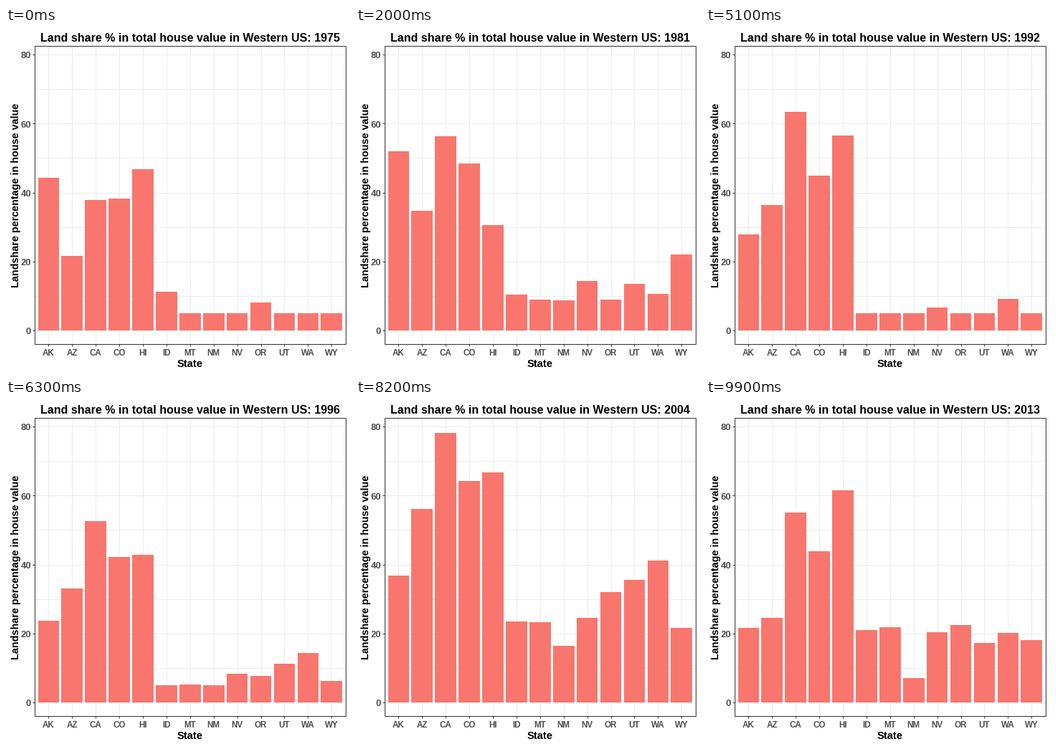
Animation of 480 by 480 pixels, one loop 10 s. Source, as a matplotlib script:

```python
import matplotlib.pyplot as plt
import numpy as np
from matplotlib.animation import FuncAnimation
from matplotlib.patches import Rectangle

SIZE, DPI = 480, 96
FRAMES, INTERVAL = 100, 100
LEFT, TOP, RIGHT, BOTTOM = 40, 25, 474, 441
FIRST_X, STEP = 59.36, 32.908
BAR_W = 0.9 * STEP
BASE_Y, UNIT = 422, 4.812
FLOOR, SWING = 5, 0.18
SALMON, GRID, DARK, GREY = "#F8766D", "#EBEBEB", "#333333", "#4D4D4D"

# A few key points per state; the market cycle fills the years between.
KEY_YEARS = [1975, 1981.5, 1987, 1992, 2001, 2008, 2013]
SHARES = {
    "AK": [44.3, 52, 35, 27.9, 29.8, 32.7, 21.7],
    "AZ": [21.7, 34.8, 41.6, 36.4, 45.1, 50.1, 24.6],
    "CA": [37.9, 56.4, 54.9, 63.4, 64.3, 68, 55.1],
    "CO": [38.3, 48.5, 46, 44.9, 59.3, 49.5, 43.9],
    "HI": [46.8, 30.6, 33.3, 56.6, 46.2, 67, 61.6],
    "ID": [11.3, 10.4, 9, FLOOR, 7.3, 32.5, 21],
    "MT": [FLOOR, 9, 9.6, FLOOR, 8.2, 31.4, 21.9],
    "NM": [FLOOR, 8.8, 8.8, FLOOR, 5.2, 22.7, 7.1],
    "NV": [FLOOR, 14.4, 5.5, 6.7, 14.4, 27.1, 20.4],
    "OR": [8.1, 9, 6.3, FLOOR, 15, 39.1, 22.5],
    "UT": [FLOOR, 13.6, 10.4, FLOOR, 24.6, 35.6, 17.3],
    "WA": [FLOOR, 10.6, FLOOR, 9.2, 27.9, 42, 20.2],
    "WY": [FLOOR, 22.1, 11.5, FLOOR, 10.6, 26.2, 18.1],
}

plt.rcParams["font.family"] = "Liberation Sans"
plt.rcParams["font.weight"] = "bold"

fig = plt.figure(figsize=(SIZE / DPI, SIZE / DPI), dpi=DPI, facecolor="white")
ax = fig.add_axes([0, 0, 1, 1])
ax.set_xlim(0, SIZE)
ax.set_ylim(SIZE, 0)
ax.axis("off")


def share_at(year, keys):
    """Linear between key years, with boom and bust swings by turns."""
    pos = np.interp(year, KEY_YEARS, range(len(KEY_YEARS)))
    return max(FLOOR, np.interp(year, KEY_YEARS, keys) * (1 + SWING * np.sin(np.pi * pos)))


def half_years(frame):
    """Early years hold for two frames, later ones for one."""
    if frame < 69:
        return 2 * (frame // 3) + (frame % 3 == 2)
    return frame - 23


def y_of(value):
    return BASE_Y - UNIT * value


def line(x0, y0, x1, y1, color, z):
    ax.plot([x0, x1], [y0, y1], color=color, lw=0.75, zorder=z,
            solid_capstyle="butt")


def label(x, y, text, px, color="black", ha="center", **kw):
    return ax.text(x, y, text, fontsize=px * 72 / DPI, color=color,
                   ha=ha, va="baseline", **kw)


for v in range(0, 81, 10):
    line(LEFT, y_of(v), RIGHT, y_of(v), GRID, 1)
    if v % 20 == 0:
        line(LEFT - 3, y_of(v), LEFT, y_of(v), DARK, 3)
        label(35.2, y_of(v) + 5.4, str(v), 13, GREY, ha="right")

bars = []
for i, state in enumerate(SHARES):
    x = FIRST_X + i * STEP
    line(x, TOP, x, BOTTOM, GRID, 1)
    line(x, BOTTOM, x, BOTTOM + 3, DARK, 3)
    label(x, 457, state, 11.6, GREY)
    bars.append(ax.add_patch(Rectangle((x - BAR_W / 2, BASE_Y), BAR_W, 0,
                                       fc=SALMON, lw=0, zorder=2)))

ax.add_patch(Rectangle((LEFT, TOP), RIGHT - LEFT, BOTTOM - TOP,
                       fill=False, ec=DARK, lw=0.75, zorder=4))
label(257, 473, "State", 14.7)
label(18, 233, "Landshare percentage in house value", 14.4,
      rotation=90, rotation_mode="anchor")
title = label(257.4, 19, "", 16)


def update(frame):
    k = half_years(frame)
    for bar, keys in zip(bars, SHARES.values()):
        bar.set_height(-UNIT * share_at(1975 + k / 2, keys))
    title.set_text(f"Land share % in total house value in Western US: {1975 + k // 2}")
    return [*bars, title]


anim = FuncAnimation(fig, update, frames=FRAMES, interval=INTERVAL,
                     repeat=True, repeat_delay=0, blit=False)
plt.show()
```
